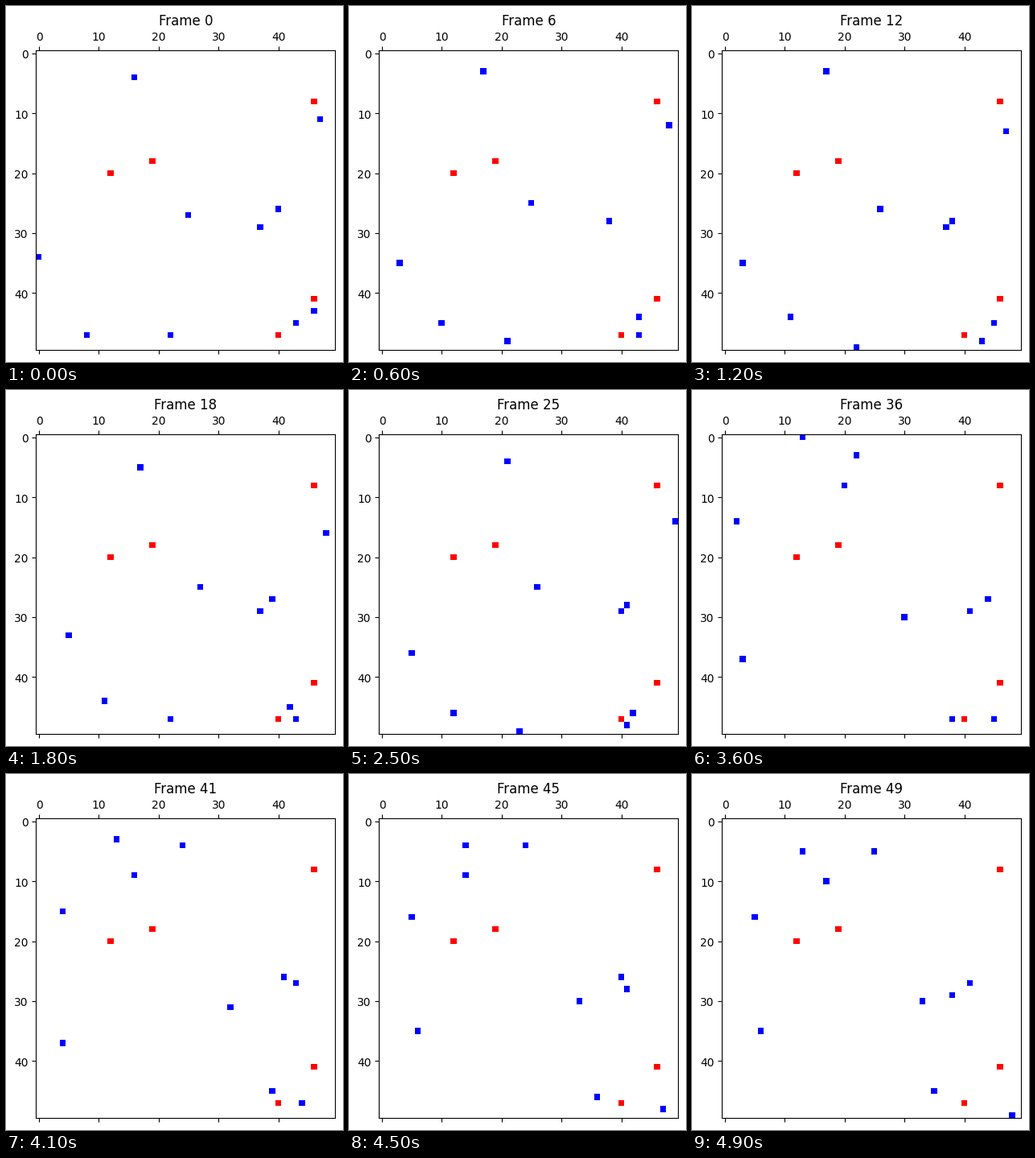
Animation of 419 by 442 pixels, one loop 5000 ms. Source, as a matplotlib script:

```python
import random

import matplotlib.pyplot as plt
import numpy as np
from matplotlib.animation import FuncAnimation
from matplotlib.transforms import ScaledTranslation

WIDTH, HEIGHT, DPI = 419, 442, 100
SIZE, FRAMES = 50, 50
SIDE = 371.999  # just under 372, so the image is not rounded up a pixel
LABEL_DROP = 0.91  # pixels
WHITE, BLUE, RED = (255, 255, 255), (0, 0, 255), (255, 0, 0)
STEPS = [(1, 0), (-1, 0), (0, 1), (0, -1)]

OBSTACLES = [(46, 8), (19, 18), (12, 20), (46, 41), (40, 47)]
# First and last cell of each walker; cells past the edge wrap around.
WALKS = [
    ((16, 4), (17, 10)),
    ((47, 11), (55, 16)),
    ((25, 27), (33, 30)),
    ((37, 29), (41, 27)),
    ((40, 26), (38, 29)),
    ((46, 43), (35, 45)),
    ((43, 45), (48, 49)),
    ((8, 47), (13, 55)),
    ((22, 47), (25, 55)),
    ((0, 34), (6, 35)),
]

rng = random.Random(7)


def random_walk(start, end):
    """Cells of a random walk of unit steps from start to end, one per frame."""
    dx, dy = np.subtract(end, start)
    steps = [(np.sign(dx), 0)] * abs(dx) + [(0, np.sign(dy))] * abs(dy)
    spare = FRAMES - 1 - len(steps)
    for _ in range(spare // 2):
        sx, sy = rng.choice(STEPS)
        steps += [(sx, sy), (-sx, -sy)]
    steps += [(0, 0)] * (spare % 2)
    rng.shuffle(steps)
    return np.cumsum([start, *steps], axis=0) % SIZE


walkers = [random_walk(start, end) for start, end in WALKS]


def grid(frame):
    cells = np.full((SIZE, SIZE, 3), WHITE, dtype=np.uint8)
    for path in walkers:
        x, y = path[frame]
        cells[y, x] = BLUE
    for x, y in OBSTACLES:
        cells[y, x] = RED
    return cells


plt.rcParams["font.family"] = "DejaVu Sans"
fig = plt.figure(figsize=(WIDTH / DPI, HEIGHT / DPI), dpi=DPI)
ax = fig.add_axes((37.35 / WIDTH, 14.86 / HEIGHT, SIDE / WIDTH, SIDE / HEIGHT))
image = ax.matshow(grid(0))
ax.set_xticks(range(0, SIZE, 10))
ax.set_yticks(range(0, SIZE, 10))
drop = ScaledTranslation(0, -LABEL_DROP / DPI, fig.dpi_scale_trans)
for label in ax.get_xticklabels() + ax.get_yticklabels():
    label.set_transform(label.get_transform() + drop)
title = ax.set_title("Frame 0")


def update(frame):
    image.set_data(grid(frame))
    title.set_text(f"Frame {frame}")
    return image, title


animation = FuncAnimation(fig, update, frames=FRAMES, interval=100,
                          repeat=True, repeat_delay=0, blit=False)
plt.show()
```
